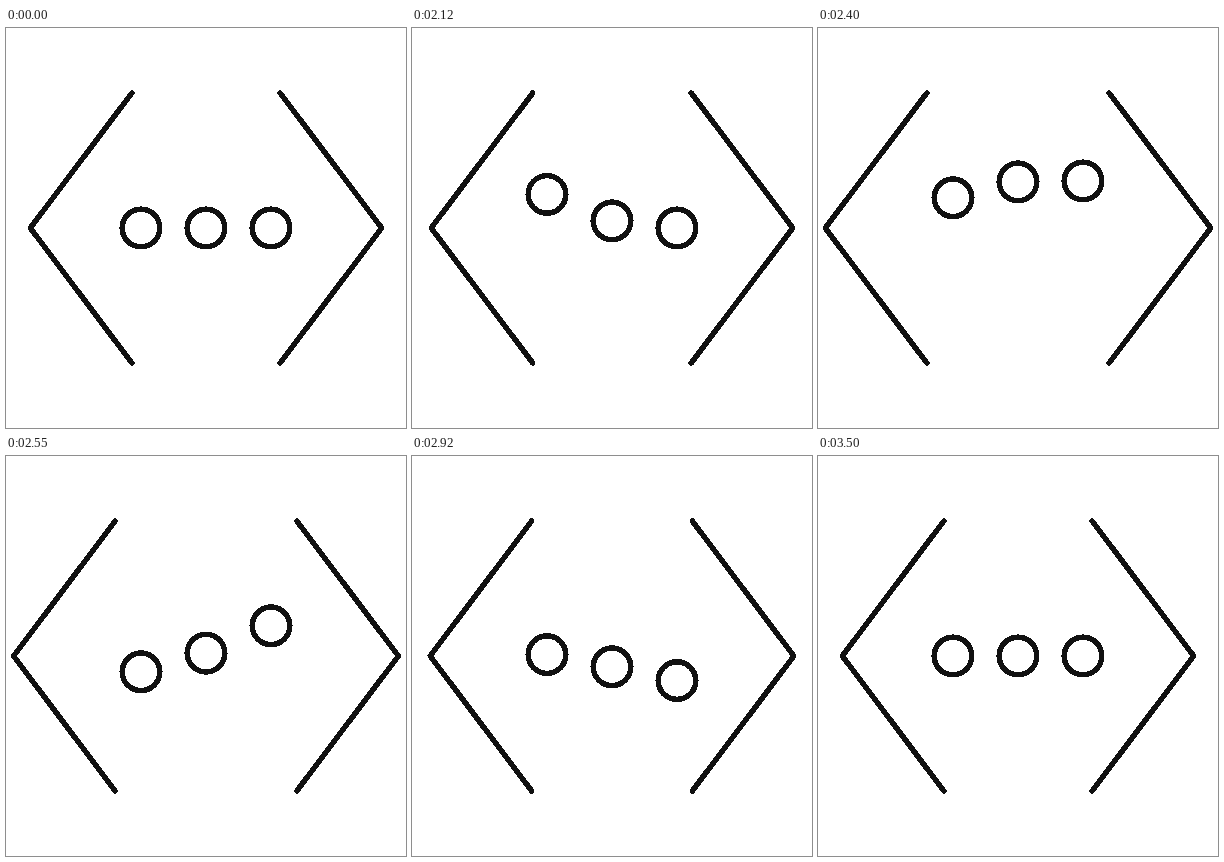
An HTML page for the animation above (3520 ms loop, 400 by 400 pixels).

```html
<!DOCTYPE html>
<html lang="en">
<head>
<meta charset="utf-8">
<title>Code brackets</title>
<style>
  html, body { margin: 0; width: 100%; height: 100%; overflow: hidden; background: #fff; }
  svg { display: block; width: 100vw; height: 100vh; }
</style>
</head>
<body>
<svg viewBox="0 0 400 400" fill="none" stroke="#111" stroke-width="5.5" stroke-linecap="round"
     stroke-linejoin="round" shape-rendering="crispEdges">
  <path class="bracket" d="M125.8 65.1 L24.3 200 L125.8 334.9"/>
  <path class="bracket" d="M274.2 65.1 L375.7 200 L274.2 334.9"/>
  <circle class="dot" cx="135" cy="200" r="18.8"/>
  <circle class="dot" cx="200" cy="200" r="18.8"/>
  <circle class="dot" cx="265" cy="200" r="18.8"/>
</svg>
<script>
const LOOP = 3520, REST = 2000, STEP = 25, STAGGER = 75;

// Same curve as cubic-bezier(1/3, 0, 1/3, 1)
function ease(x) {
  let lo = 0, hi = 1;
  for (let i = 0; i < 20; i++) {
    const s = (lo + hi) / 2;
    if (s - s * s + s * s * s < x) lo = s; else hi = s;
  }
  return lo * lo * (3 - 2 * lo);
}

// Eased move from 0 to 1 between two times
const move = (t, from, to) => ease(Math.min(1, Math.max(0, (t - from) / (to - from))));

// Up, down past rest, small rebound, settle
const bounce = t =>
  -47 * move(t, 0, 250) + 75 * move(t, 300, 715) - 37.5 * move(t, 715, 1095) + 9.5 * move(t, 1095, 1350);

const spread = t => 17.2 * (move(t, 0, 450) - move(t, 450, 1500));

const brackets = document.querySelectorAll('.bracket');
const dots = document.querySelectorAll('.dot');

function draw(now) {
  const time = Math.floor((now % LOOP + 5) / STEP) * STEP - REST;
  brackets.forEach((el, i) => el.setAttribute('transform', `translate(${spread(time) * (i ? 1 : -1)} 0)`));
  dots.forEach((el, i) => el.setAttribute('cy', 200 + bounce(time - i * STAGGER)));
}

function tick() {
  draw(performance.now());
  requestAnimationFrame(tick);
}
tick();
</script>
</body>
</html>
```
